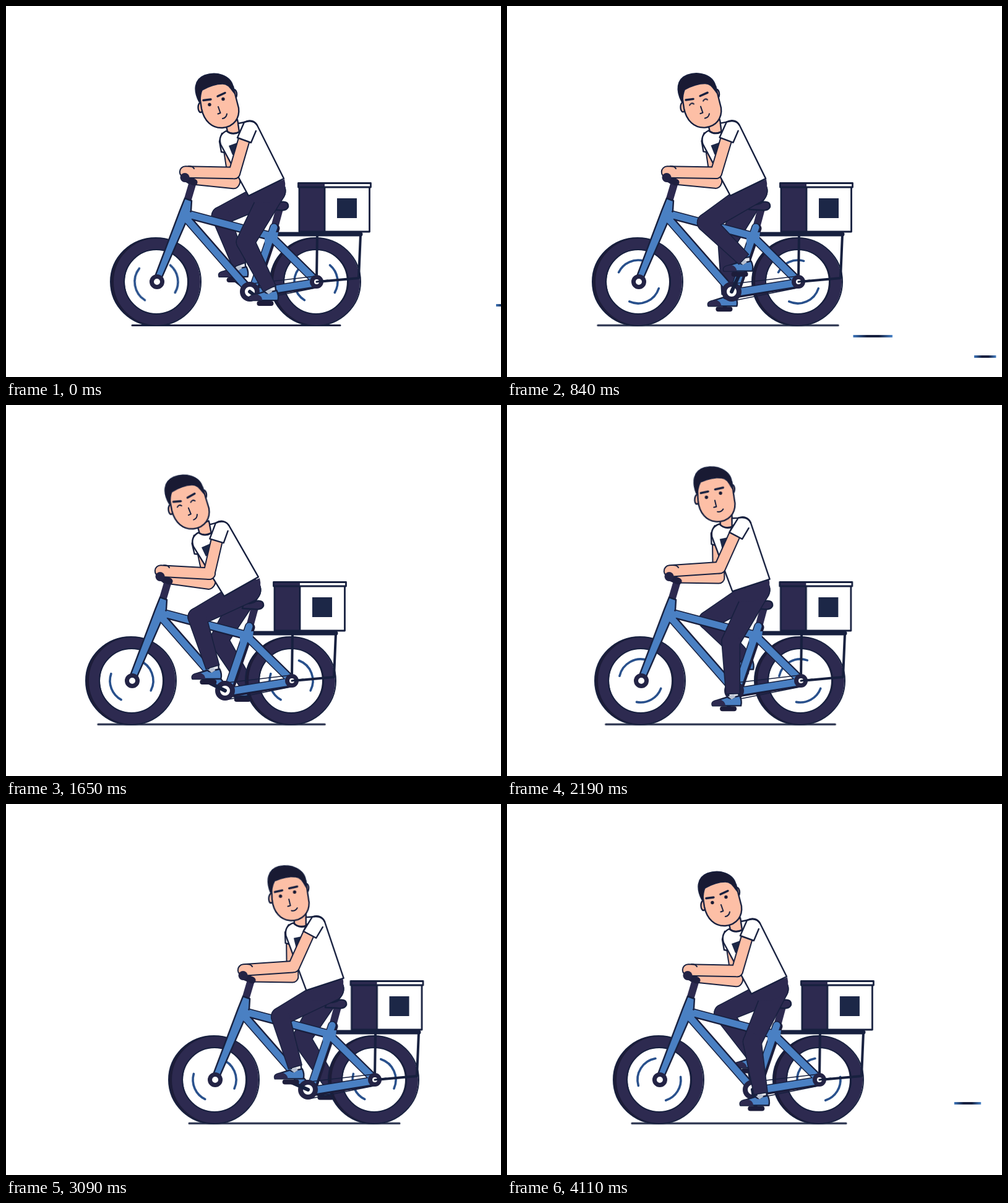
Animation of 800x600 px, one loop 4140 ms. Source, as an HTML page without scripts:

```html
<!DOCTYPE html>
<html lang="en">
<head>
<meta charset="utf-8">
<title>Delivery rider</title>
<style>
@property --p { syntax: '<number>'; inherits: true; initial-value: 0; }
@property --l { syntax: '<number>'; inherits: true; initial-value: 0; }
@property --w { syntax: '<number>'; inherits: true; initial-value: 1; }

html, body { margin: 0; width: 100%; height: 100%; overflow: hidden; background: #fff; }
svg { display: block; width: 800px; height: 600px; }

/* --p pedal turns, --l body lean, --w ground width */
svg {
  --ink: #17203f; --navy: #2d2a50; --blue: #4a80c3; --skin: #fdbfa6;
  animation: pedal 4140ms linear infinite, lean 4140ms ease-in-out infinite;
}
@keyframes pedal {
  0%     { --p: 0; --w: 1; animation-timing-function: steps(22); }
  20.29% { --p: 3.289; --w: 1.155; animation-timing-function: steps(22); }
  39.86% { --p: 6.531; --w: 1.09; animation-timing-function: steps(25); }
  63.04% { --p: 10.589; --w: 1.113; animation-timing-function: steps(13); }
  74.64% { --p: 12.539; --w: 1.012; animation-timing-function: steps(12); }
  85.51% { --p: 14.367; --w: 1.107; animation-timing-function: steps(15); }
  99.28% { --p: 16.883; --w: 1.03; animation-timing-function: steps(1); }
  100%   { --p: 17; --w: 1; }
}
@keyframes lean {
  0%, 100% { --l: 0; }
  20.29% { --l: .05; }
  39.86% { --l: -.4; }
  44% { --l: -.45; }
  53.6% { --l: 1; }
  58.4% { --l: 1.4; }
  63.04% { --l: 1; }
  68.8% { --l: 1.4; }
  74.64% { --l: 1; }
  79.9% { --l: 1.2; }
  85.51% { --l: -.05; }
}

.ride { animation: ride 4140ms linear infinite; }
@keyframes ride {
  0%, 100% { transform: translateX(0); }
  7.25% { transform: translateX(-18px); }
  20.29% { transform: translateX(-31px); }
  30% { transform: translateX(-37px); }
  39.86% { transform: translateX(-40px); }
  45% { transform: translateX(-42px); }
  49.5% { transform: translateX(-37px); }
  53.6% { transform: translateX(-25px); }
  63.04% { transform: translateX(30px); }
  66.7% { transform: translateX(53px); }
  74.64% { transform: translateX(94px); }
  77% { transform: translateX(97px); }
  79.7% { transform: translateX(91px); }
  85.51% { transform: translateX(64px); }
  99.28% { transform: translateX(3px); }
}

/* the box slides a little on its rack */
.box { animation: slide 4140ms ease-in-out infinite; }
@keyframes slide {
  0%, 45%, 100% { transform: translateX(0); }
  61%, 86% { transform: translateX(-9.5px); }
}

.dash rect {
  height: 4px; fill: url(#streak);
  animation: dash 4140ms linear infinite;
  animation-delay: calc(var(--s) * 1ms - 4140ms);
}
@keyframes dash {
  0% { transform: scaleX(0); }
  2% { transform: scaleX(1); }
  10.4%, 100% { transform: translateX(800px) scaleX(.25); }
}

.ground { transform: translate(372px, 516.5px) scaleX(var(--w)); }

.spin { transform: rotate(calc(170deg - var(--p) * 1turn)); }

/* two-bone leg: hip at (432,299), thigh 94, shin 86 */
.leg, .crank {
  --a: calc(38deg + var(--o) - var(--p) * 1turn);
  --x: calc(31 * cos(var(--a)) - 30);
  --y: calc(31 * sin(var(--a)) + 140);
  --d: hypot(var(--x), var(--y));
  --b: atan2(var(--y), var(--x));
  --t: calc(var(--b) + acos((var(--d) * var(--d) + 1440) / (188 * var(--d))));
  --k: calc(var(--b) - acos((var(--d) * var(--d) - 1440) / (172 * var(--d))));
}
.near { --o: 0deg; }
.far { --o: 180deg; }
.thigh { transform: translate(432px, 299px) rotate(var(--t)); }
.shin { transform: translate(432px, 299px) rotate(var(--t)) translateX(94px) rotate(calc(var(--k) - var(--t))); }
.foot { transform: translate(calc(432px + var(--x) * 1px), calc(299px + var(--y) * 1px)); }
.arm-crank { transform: translate(394px, 462px) rotate(var(--a)); }

.torso { transform: translate(432px, 299px) rotate(calc(var(--l) * 8deg)) translate(-432px, -299px); }
.head { transform: translate(calc(var(--l) * 21px), calc(var(--l) * -9px)) translate(342px, 155px) rotate(calc(var(--l) * 6deg)) translate(-342px, -155px); }
.upper { transform: translate(calc(var(--l) * 2px), calc(var(--l) * -7px)) translate(369px, 270px) rotate(calc(var(--l) * 8deg)) translate(-369px, -270px); }
.fore { transform: translate(291px, 269px) rotate(calc(var(--l) * -5deg)) translate(-291px, -269px); }
.turn { transform-box: fill-box; transform-origin: center; transform: rotate(calc(var(--l) * var(--r))); }

.open { animation: blink 4140ms step-end infinite; }
.shut { animation: squint 4140ms step-end infinite; }
@keyframes blink { 0%, 100% { opacity: 1; } 12% { opacity: 0; } 50% { opacity: 1; } }
@keyframes squint { 0%, 100% { opacity: 0; } 12% { opacity: 1; } 50% { opacity: 0; } }

.ink { fill: none; stroke: var(--ink); stroke-linecap: round; stroke-linejoin: round; }
.line { stroke: var(--ink); stroke-width: 2.4; stroke-linejoin: round; stroke-linecap: round; }
.navy { fill: var(--navy); }
.blue { fill: var(--blue); }
.edge { fill: var(--ink); stroke: var(--ink); stroke-width: 3; }
.tube { fill: none; stroke-linecap: round; stroke-linejoin: round; }
.limb { fill: none; stroke-linecap: round; }
.limb .o { stroke: var(--ink); stroke-width: 20.5; }
.limb .f { stroke: var(--skin); stroke-width: 16.5; }
</style>
</head>
<body>
<svg viewBox="0 0 800 600">
  <defs>
    <linearGradient id="streak">
      <stop offset="0" stop-color="#3f78bd"/>
      <stop offset=".35" stop-color="#17203f"/>
      <stop offset=".65" stop-color="#17203f"/>
      <stop offset="1" stop-color="#4a86cc"/>
    </linearGradient>

    <path id="thigh" d="M0-19 L94-14 A14 14 0 0 1 94 14 L0 19 A19 19 0 0 1 0-19Z"/>
    <path id="shin" d="M0-14 L84-10.500 V10.500 L0 14 A14 14 0 0 1 0-14Z"/>
    <g id="foot">
      <rect x="-21" y="19" width="27" height="8" rx="4" fill="#1d1d3b"/>
      <path class="line" d="M-7-2 L9-5 L10 6 L-6 8Z" fill="#e4e6ec"/>
      <path class="line blue" d="M-9 4 Q-3 9 2 4 L11 2 Q15 10 13 18 H-33 Q-36 11-25 9Z"/>
      <path class="navy" d="M-21 8 Q-13 10-12 18 H-33 Q-36 11-25 9Z"/>
      <path d="M-8 3 L-2 8 L4 4 L1 0Z" fill="#b9c2d2"/>
    </g>
    <g id="leg">
      <use href="#foot" class="foot"/>
      <g class="edge"><use href="#thigh" class="thigh"/><use href="#shin" class="shin"/></g>
      <g class="navy"><use href="#thigh" class="thigh"/><use href="#shin" class="shin"/></g>
    </g>

    <g id="wheel">
      <circle cx="-3" r="62" fill="none" stroke="#1c1c38" stroke-width="18"/>
      <circle cx="1" r="61" fill="none" stroke="#2d2a50" stroke-width="18"/>
      <ellipse cx="-1" rx="73" ry="71" class="ink" stroke-width="2"/>
      <circle r="52" class="ink" stroke-width="2"/>
      <g class="spin" fill="none" stroke="#28508c" stroke-width="3.600" stroke-linecap="round">
        <path d="M23.400-26 A35 35 0 0 1 23.400 26"/>
        <path d="M-26.800 22.500 A35 35 0 0 1-26.800-22.500"/>
      </g>
    </g>

    <path id="tubes" d="M292 336 L424 371 M290 342 L387 453 M433 358 L400 455 M428 373 L497 441 M404 463 L497 448"/>
  </defs>

  <g class="dash">
    <rect y="482" width="135" style="--s:3714"/>
    <rect y="565" width="122" style="--s:430"/>
    <rect y="532" width="134" style="--s:515"/>
    <rect y="552" width="110" style="--s:1150"/>
    <rect y="552" width="85" style="--s:2240"/>
    <rect y="482" width="73" style="--s:2344"/>
    <rect y="565" width="140" style="--s:3457"/>
    <rect y="354.500" width="214" style="--s:3408"/>
    <rect y="374.500" width="155" style="--s:3419"/>
    <rect y="204.500" width="75" style="--s:3395"/>
  </g>

  <g class="ride">
    <path class="ground ink" d="M-168 0 H168" stroke-width="3"/>

    <g class="crank far"><path class="arm-crank ink" d="M0 0 H31" stroke-width="6"/></g>
    <g class="leg far"><use href="#leg"/></g>

    <use href="#wheel" x="243" y="446"/>
    <use href="#wheel" x="501" y="446"/>

    <!-- rack and box -->
    <path class="ink" d="M440 369 H573" stroke-width="7"/>
    <path class="ink" d="M573 370 L570 440 L504 446 M503 371 L502 440" stroke-width="4"/>
    <g class="box">
      <rect x="474" y="292" width="113.500" height="73" fill="#fff"/>
      <path class="navy" d="M474 292 H515 V365 H474Z"/>
      <path class="ink" d="M515 292 V365 M474 292 V365 H587.500 V292" stroke-width="2.800"/>
      <rect x="472.500" y="286.500" width="117" height="6.500" fill="#fff"/>
      <path class="navy" d="M472.500 286.500 H515 V293 H472.500Z"/>
      <rect x="472.500" y="286.500" width="117" height="6.500" class="ink" stroke-width="2.800"/>
      <rect x="535" y="311" width="32" height="32" fill="#1c2747"/>
    </g>

    <!-- saddle -->
    <path d="M442 328 L435 354" class="tube" stroke="#2d2a50" stroke-width="12"/>
    <path class="navy line" d="M424 321 Q438 322 444 317 Q457 315 456 325 Q453 332 440 330 L422 329Z"/>

    <!-- far arm -->
    <g class="limb">
      <g class="o"><path class="upper" d="M361 232 L369 284"/><path class="fore" d="M300 279 L368 286"/></g>
      <g class="f"><path class="upper" d="M361 232 L369 284"/><path class="fore" d="M300 279 L368 286"/></g>
    </g>

    <!-- frame -->
    <path d="M302 285 L294 312" class="tube" stroke="#2d2a50" stroke-width="12"/>
    <path d="M290 279 L304 285" class="tube" stroke="#1f1f3f" stroke-width="11"/>
    <g class="tube">
      <use href="#tubes" x="2.500" y="1.500" stroke="#1d1d3b" stroke-width="14"/>
      <use href="#tubes" stroke="#17203f" stroke-width="14"/>
      <use href="#tubes" stroke="#4a80c3" stroke-width="11"/>
    </g>
    <path class="line blue" d="M289 311 L300 315 L299 331 L251 441 L241 437 L281 331Z"/>
    <path class="blue" d="M290 328 L306 339 L291 352 L284 344Z M418 366 L440 366 L438 382 L418 384Z"/>
    <path class="ink" d="M398 449 L500 437 M400 476 L500 456" stroke-width="1.600"/>
    <g fill="#fff" stroke="#232345">
      <circle cx="244" cy="446" r="8.500" stroke-width="7"/>
      <circle cx="502" cy="446" r="7.500" stroke-width="7"/>
      <circle cx="394" cy="462" r="12" stroke-width="8"/>
    </g>
    <path class="ink" d="M502 446 L520 444" stroke-width="3"/>
    <g class="crank near"><path class="arm-crank ink" d="M0 0 H31" stroke-width="6"/></g>

    <!-- rider -->
    <g class="leg near"><use href="#leg"/></g>
    <path class="navy" d="M391 306 L450 280 Q454 294 446 309 L426 317 L402 318Z"/>

    <g class="torso">
      <path class="line" d="M355 190 L358 203 Q366 209 378 203 L374 184Z" fill="#fdbfa6"/>
      <path class="line" d="M349 206 L345 219 L348 236 L360 238Z" fill="#fff"/>
      <path class="line" d="M385 188 C394 183 402 186 406 193 L449 279 L392 307 L347 224 C343 211 350 205 356 202 Q366 210 377 204 L375 190Z" fill="#fff"/>
      <path d="M360 226 L374 221 L379 236 L366 241Z" fill="#1c2747"/>
    </g>

    <g class="head">
      <g fill="#fdbfa6" class="line">
        <ellipse cx="368.500" cy="143" rx="4.500" ry="8"/>
        <ellipse cx="314.500" cy="164" rx="4" ry="8"/>
        <path d="M312 140 L316 166 C320 186 333 198 350 197 C369 195 378 181 376 165 L367 130 L335 118Z"/>
      </g>
      <path d="M312 155 C303 138 303 119 321 112 C340 105 363 112 367 130 L369 141 C363 134 360 126 350 126 C339 126 326 131 317 136 Q314 143 314 155Z" fill="#191a33" stroke="#17203f" stroke-width="1.500"/>
      <g class="ink" stroke-width="3.400">
        <path class="turn" style="--r:-11deg" d="M319 152.500 L331 151"/>
        <path class="turn" style="--r:6deg" d="M342 146 L354 140.500"/>
      </g>
      <g class="open" fill="#191a33"><circle cx="329" cy="159.500" r="2.700"/><circle cx="351" cy="150.500" r="2.700"/></g>
      <path class="shut ink" d="M325 161 Q328 156 332 159 M347 154 Q350 149 354 152" stroke-width="2"/>
      <path class="ink" d="M343 163 L346.500 173 L342.500 174.500" stroke-width="2"/>
      <path class="turn ink" style="--r:16deg" d="M350 182 Q356 181 357 174.500" stroke-width="2"/>
    </g>

    <g class="limb">
      <g class="o"><path class="upper" d="M388 205 L369 270"/><path class="fore" d="M290 268.500 L369 270"/></g>
      <g class="f"><path class="upper" d="M388 205 L369 270"/><path class="fore" d="M290 268.500 L369 270"/></g>
    </g>
    <path class="ink" d="M295 259 Q302 259 304 263" stroke-width="2"/>
    <circle cx="289" cy="277.500" r="7.500" fill="#232345"/>
    <g class="torso">
      <path d="M385 189 L374 213 L396 221 L407 200 Q400 184 385 189Z" fill="#fff"/>
      <path class="ink" d="M406 193 Q400 183 385 188 L374 213 L396 221 L404 202" stroke-width="2.400"/>
    </g>
  </g>
</svg>
</body>
</html>
```
